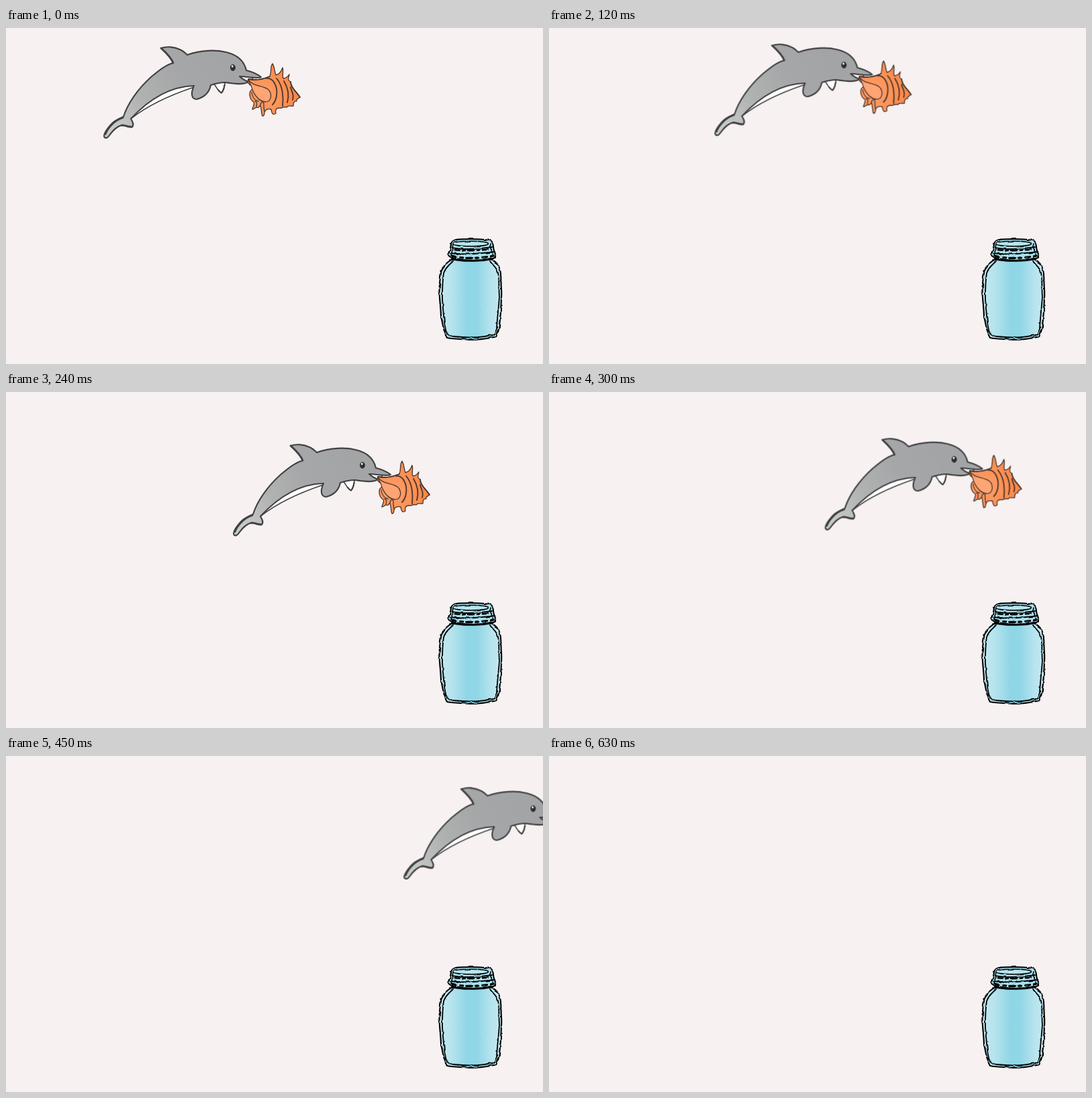
An HTML page that plays this animation: 800x500 px, repeating every 660 ms.

```html
<!DOCTYPE html>
<html lang="en">
<head>
<meta charset="utf-8">
<title>Dolphin and jar</title>
<style>
  html, body { margin: 0; width: 100%; height: 100%; overflow: hidden; background: #f7f1f1; }
  svg { display: block; width: 800px; height: 500px; }
  path, ellipse { stroke-linecap: round; stroke-linejoin: round; }

  /* 22 poses of 30 ms; the small delay keeps clear of the step edges */
  .swim { animation: swim 660ms -1ms infinite; }
  @keyframes swim {
    0%        { transform: translate(0, 0); animation-timing-function: steps(3); }
    13.63636% { transform: translate(78.5px, -17.4px); animation-timing-function: steps(5); }
    36.36364% { transform: translate(193px, 50px); animation-timing-function: steps(13); }
    95.45455% { transform: translate(665.3px, -7px); animation-timing-function: steps(1); }
    100%      { transform: translate(665.3px, -7px); }
  }

  .dolphin { stroke: #414142; stroke-width: 2.1; fill: url(#skin); }
  .white { fill: #fff; stroke-width: 1.6; }
  .shell { stroke: #49352c; stroke-width: 1.3; fill: url(#coral); }
  .line { fill: none; }
  .rib { fill: none; stroke-width: 1.8; }
  .jar { stroke: #000; stroke-width: 2.1; fill: none; }
</style>
</head>
<body>
<svg viewBox="0 0 800 500">
  <defs>
    <linearGradient id="skin" gradientUnits="userSpaceOnUse" x1="160" y1="150" x2="330" y2="50">
      <stop offset="0" stop-color="#c6cac7"/>
      <stop offset=".3" stop-color="#b0b2b2"/>
      <stop offset=".6" stop-color="#a6a7a8"/>
      <stop offset="1" stop-color="#a3a4a5"/>
    </linearGradient>
    <radialGradient id="coral" gradientUnits="userSpaceOnUse" cx="384" cy="100" r="50">
      <stop offset="0" stop-color="#ff9f69"/>
      <stop offset="1" stop-color="#fb8848"/>
    </radialGradient>
    <linearGradient id="glass" gradientUnits="userSpaceOnUse" x1="646" y1="0" x2="738" y2="0">
      <stop offset="0" stop-color="#c5e9f1"/>
      <stop offset=".2" stop-color="#b5e3ed"/>
      <stop offset=".45" stop-color="#8fd6e6"/>
      <stop offset=".6" stop-color="#8fd6e6"/>
      <stop offset=".85" stop-color="#b8e4ee"/>
      <stop offset="1" stop-color="#c5e9f1"/>
    </linearGradient>
    <filter id="wobble" filterUnits="userSpaceOnUse" x="635" y="305" width="115" height="170" color-interpolation-filters="sRGB">
      <feTurbulence type="fractalNoise" baseFrequency=".12" numOctaves="2" seed="4"/>
      <feDisplacementMap in="SourceGraphic" scale="3" xChannelSelector="R" yChannelSelector="G"/>
    </filter>
  </defs>

  <g class="jar" filter="url(#wobble)">
    <path fill="url(#glass)" d="M663 345 C656 350 651 354 649 361 C646 370 646 381 645.5 392 C646 407 648 418 648 430 C651 439 651 451 657 461 C668 463 680 463 692 464 C706 464 719 462 730 459 C736 449 735 438 737 424 C737 412 739 400 738 388 C737 378 738 367 736 360 C734 351 729 348 723 344 Z"/>
    <path stroke-width="1.8" d="M666 347 C660 353 654 357 652 365 C650 378 650 390 650 402 C651 419 652 436 655 449 C656 457 661 459 668 459 C684 461 705 461 718 458 C728 458 731 454 731 446 C732 430 734 415 735 400 C734 388 735 374 733 364 C731 356 725 353 721 347"/>
    <path fill="#a9dfeb" d="M664 319 C667 314 676 314 692 314 C708 314 718 315 723 317 C727 320 725 326 727 331 C730 337 730 342 724 344 C710 347 682 348 670 345 C662 343 657 340 660 333 C663 329 662 323 664 319 Z"/>
    <ellipse cx="692.5" cy="321" rx="26" ry="3.8" fill="#b8e5ee" stroke-width="1.6"/>
    <path stroke-width="1.6" d="M666 322 C664 328 665 333 663 338 M722 321 C720 327 724 330 725 337"/>
    <path stroke-width="1.8" d="M665 327 C680 330 704 329 724 326 M662 335 C681 338 706 336 728 333"/>
    <path stroke-width="2.6" stroke-dasharray="8 5 3 5" d="M668 330 C684 332 705 331 722 329"/>
    <path stroke-width="3.2" stroke-dasharray="7 6 4 6" d="M664 339 C682 344 704 343 726 339"/>
    <path stroke-width="2.4" d="M664 342 C684 347 705 347 724 343"/>
  </g>

  <g class="swim">
    <g class="dolphin">
      <path class="white" d="M309 83 C313 85 314 93 321 96.5 C325 92 326 87 326 80 Z"/>
      <path class="line" d="M316 92 C318 95 320 96 321 96.5 C324 93 325 89 325.5 85"/>
      <path class="white" d="M186 135 C209 117 241 101 280 88 L279 83 C238 84 207 107 186 135 Z"/>
      <path class="white" d="M345 71 L362 82 L368 74 Z"/>
      <path d="M147 163 C144 160 149 152 156 144 C162 137 169 135 175 132 C181 113 196 91 216 73 C228 63 238 55 249 52 C246 44 238 37 231 30 C239 27 251 28 259 32 C264 34 267 37 270 40 C290 33 312 32 328 36 C345 40 355 50 358 63 C366 65 374 68 380 73 C373 76 361 72 348 72 C352 76 356 78 361 80 C355 85 340 83 327 81 C319 81 311 83 305 85 C303 95 296 103 284 106 C276 106 275 97 280 86 C245 87 213 106 186 135 C189 140 191 144 188 147 C181 149 178 143 171 145 C162 148 158 155 153 161 C151 164 149 164 147 163 Z"/>
      <path class="line" d="M231 30 C239 37 246 44 249 52 M148 158 C151 150 160 138 174 133.5 M172 145 C178 144 181 148 188 147" stroke-width="2.8"/>
      <ellipse cx="338" cy="59" rx="3.6" ry="4.6" fill="#2d2d2e" stroke-width="1"/>
      <ellipse cx="337.3" cy="57" rx="1.3" ry="1.8" fill="#fff" stroke="none"/>
    </g>
    <g class="shell">
      <path d="M361 76 C371 78 383 76 393 72 C396 65 393 58 397 53 C400 57 400 65 402 70 C407 69 410 65 412 59 C414 64 411 70 413 75 C417 75 420 72 422 69 C421 74 419 78 424 80 C424 86 428 91 431 94 C434 97 436 100 438 103 C434 106 432 106 433 109 C429 108 428 112 428 116 C424 117 421 114 418 118 C414 116 411 120 407 119 C402 119 401 123 402 127 C398 130 396 128 395 121 C390 120 386 121 385 126 C385 130 384 131 382 131 C380 127 381 120 379 116 C376 116 377 120 374 118 C371 118 370 121 367 121 C368 116 371 113 369 110 C363 107 362 98 364 94 C368 91 368 88 366 86 C361 84 359 80 361 76 Z"/>
      <path fill="#ffa473" d="M361 77 C368 87 381 85 390 91 C396 96 396 105 391 109 C381 113 372 103 367 92 C366 86 363 82 361 77 Z"/>
      <path class="line" d="M366 96 C367 103 371 108 376 109 M371 109 C374 109 374 113 373 117 M379 116 C379 111 381 109 384 112 C384 116 384 120 385 124"/>
      <path class="rib" d="M388 75 C399 74 405 88 403 101 C402 108 400 111 397 114 M403 75 C410 83 414 96 412 116 M414 79 C419 87 423 97 419 111 M424 88 C425 95 430 98 427 107"/>
      <path class="rib" d="M361 76 C370 78 382 77 393 72 M424 80 C424 89 434 96 438 103"/>
    </g>
  </g>
</svg>
</body>
</html>
```
